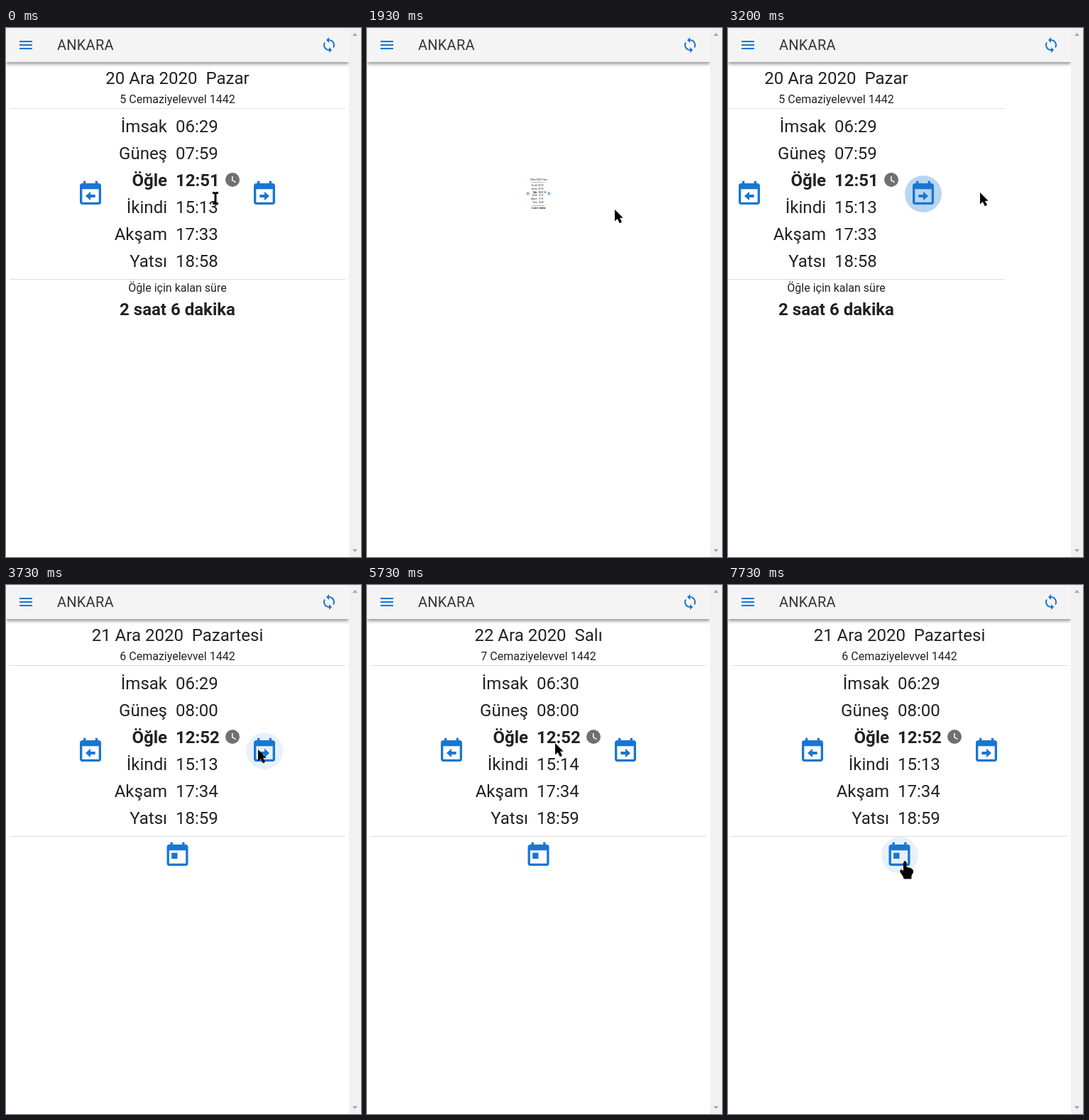
Write an HTML page that moves like this. It is 500x746 px and loops after 8000 ms.

```html
<!DOCTYPE html>
<html lang="tr">
<head>
<meta charset="utf-8">
<style>
  html, body { margin: 0; width: 100%; height: 100%; overflow: hidden; background: #fff; }
  svg { display: block; }
  text { font: 24px Roboto, sans-serif; fill: #212121; white-space: pre; }
  .mid { text-anchor: middle; }
  .end { text-anchor: end; }
  .small { font-size: 16px; }
  .bold { font-weight: 700; }
  .title { font-size: 20px; letter-spacing: .0125em; fill: #333; }
  .blue { fill: #1976d2; }
</style>
</head>
<body>
<svg width="500" height="746" viewBox="0 0 500 746">
  <defs>
    <clipPath id="view"><path d="M0 0H483V746H0z"/></clipPath>
    <filter id="shadow" x="-5%" y="-20%" width="110%" height="160%">
      <feDropShadow dx="0" dy="2.5" stdDeviation="2.8" flood-color="#000" flood-opacity=".45"/>
    </filter>
    <path id="calendar" d="M19 3h-1V1h-2v2H8V1H6v2H5c-1.1 0-2 .9-2 2v14c0 1.1.9 2 2 2h14c1.1 0 2-.9 2-2V5c0-1.1-.9-2-2-2zm0 16H5V8h14z"/>
    <path id="point" d="M8 12.6h4V10l4.2 3.8-4.2 3.7V15H8z"/>
  </defs>
  <g clip-path="url(#view)">
    <g id="page">
      <path d="M5 113.5H478M5 354.5H478" stroke="#ddd"/>
      <text id="date" class="mid" x="241.5" y="79"></text>
      <text id="hijri" class="mid small" x="241.5" y="106"></text>
      <g id="rows"></g>
      <path transform="translate(307 202)" fill="#707070" d="M12 2a10 10 0 1 0 0 20a10 10 0 1 0 0-20zm4.2 14.2L11 13V7h1.5v5.2l4.5 2.7z"/>
      <circle id="prevGlow" class="blue" cx="119" cy="234" r="26"/>
      <circle id="nextGlow" class="blue" cx="364" cy="234" r="26"/>
      <g class="blue" transform="translate(99 214) scale(1.6667)">
        <use href="#calendar"/><use href="#point" transform="matrix(-1 0 0 1 24 0)"/>
      </g>
      <g class="blue" transform="translate(344 214) scale(1.6667)">
        <use href="#calendar"/><use href="#point"/>
      </g>
      <g id="left">
        <text class="mid small" x="241.5" y="372">Öğle için kalan süre</text>
        <text class="mid bold" x="241.5" y="405">2 saat 6 dakika</text>
      </g>
      <g id="today">
        <circle id="todayGlow" class="blue" cx="242" cy="381" r="26"/>
        <g class="blue" transform="translate(221.5 361) scale(1.6667)">
          <use href="#calendar"/><path d="M7 10h5v5H7z"/>
        </g>
      </g>
    </g>
    <circle id="spinner" r="150" fill="none" stroke="#1976d2" stroke-width="20" stroke-linecap="round"/>
    <path d="M0 0H483V48H0z" fill="#f4f4f4" filter="url(#shadow)"/>
    <circle id="syncGlow" class="blue" cx="454.5" cy="24" r="22.5"/>
    <path class="blue" transform="translate(16 12)" d="M3 18h18v-2H3zm0-5h18v-2H3zm0-7v2h18V6z"/>
    <text class="title" x="72" y="31">ANKARA</text>
    <path class="blue" transform="translate(443 12)" d="M12 4V1L8 5l4 4V6c3.3 0 6 2.7 6 6 0 1-.25 2-.7 2.8l1.46 1.46C19.5 15 20 13.6 20 12c0-4.4-3.6-8-8-8zm0 14c-3.3 0-6-2.7-6-6 0-1 .25-2 .7-2.8L5.24 7.74C4.5 9 4 10.4 4 12c0 4.4 3.6 8 8 8v3l4-4-4-4z"/>
  </g>
  <path d="M483 0H500V746H483z" fill="#f1f1f1"/>
  <path id="thumb" d="M485 17H498V690H485z" fill="#c1c1c1"/>
  <path d="M488 11h7l-3.5-4z" fill="#a3a3a3"/>
  <path id="down" d="M488 735h7l-3.5 4z"/>
  <path id="cursor"/>
</svg>
<script>
const LOOP = 8000, STEP = 1000 / 15, WIDTH = 483, OUT = 200, IN = 430;
const $ = id => document.getElementById(id);
const set = (id, attrs) => { for (const k in attrs) $(id).setAttribute(k, attrs[k]); };
const show = (id, on) => { $(id).style.display = on ? '' : 'none'; };
const clamp = v => Math.max(0, Math.min(1, v));
const within = (t, a, b) => t >= a && t < b;
const smooth = p => p * p * (3 - 2 * p);

const names = ['İmsak', 'Güneş', 'Öğle', 'İkindi', 'Akşam', 'Yatsı'];
const days = [
  ['20 Ara 2020\u00a0 Pazar', 5, '06:29 07:59 12:51 15:13 17:33 18:58'],
  ['21 Ara 2020\u00a0 Pazartesi', 6, '06:29 08:00 12:52 15:13 17:34 18:59'],
  ['22 Ara 2020\u00a0 Salı', 7, '06:30 08:00 12:52 15:14 17:34 18:59']
];
// start, direction, day shown afterwards
const slides = [[3086, -1, 1], [4263, -1, 2], [6548, 1, 1]];
// time, x, y
const track = [
  [0, 295, 240], [40, 295, 240], [330, 385, 130], [600, 452, 16], [800, 452, 28],
  [1690, 452, 28], [1930, 349, 256], [2250, 353, 240], [2600, 355, 232],
  [5550, 355, 232], [5800, 230, 219], [6070, 105, 246],
  [7280, 105, 246], [7430, 125, 220], [7730, 249, 390], [LOOP, 249, 390]
];
const hands = [[560, 1720], [2480, 3120], [6010, 6580], [7660, LOOP]];
const shapes = {
  beam: 'M-4-9h3l1 1 1-1h3v3h-2.5V6H4v3H1L0 8l-1 1h-3V6h2.5V-6H-4z',
  arrow: 'M0 0V16.5l3.7-3.6 3.1 6.3 3.2-1.5-3-6h4.7z',
  hand: 'M-1.5 1Q0-2 2 1V8l7 2q3 1 2.5 5L9 20v4H-1l-1-3-4-6q-1-4 2-3l2.5 2z'
};

let shown = -1;
function setDay(n) {
  if (n === shown) return;
  shown = n;
  const [date, hijri, times] = days[n];
  $('date').textContent = date;
  $('hijri').textContent = hijri + ' Cemaziyelevvel 1442';
  $('rows').innerHTML = times.split(' ').map((time, i) => {
    const y = 147 + 38 * i, bold = i === 2 ? 'bold' : '';
    return `<text class="end ${bold}" x="227" y="${y}">${names[i]}</text>
      <text class="${bold}" x="239" y="${y}">${time}</text>`;
  }).join('');
  show('left', n === 0);
  show('today', n > 0);
}

// The page flies out to one side, swaps its day and returns from there
function slideState(t) {
  let x = 0, day = 0;
  for (const [start, dir, next] of slides) {
    const a = t - start;
    if (a < 0) break;
    if (a < OUT) x = dir * WIDTH * (a / OUT) ** 3;
    else {
      day = next;
      x = dir * WIDTH * (1 - clamp((a - OUT) / IN)) ** 3;
    }
  }
  return { x: Math.round(x), day };
}

function pageScale(t) {
  if (t < 1030) return 1 - clamp((t - 880) / 150) ** 3;
  return 1 - (1 - clamp((t - 1911) / 450)) ** 3;
}

// Hover tint plus a press ripple that fades
function glow(id, t, from, to, presses, strength = .2) {
  let alpha = .1 * clamp((t - from) / 100) * clamp((to - t) / 100);
  for (const press of presses) {
    const a = t - press;
    alpha += strength * clamp(a / 100) * clamp((360 - a) / 150);
  }
  set(id, { opacity: alpha });
}

function drawSpinner(t) {
  const on = within(t, 1035, 1905);
  show('spinner', on);
  if (!on) return;
  const p = (t - 1035) / 1400, unit = 150 / 20.2;
  const e = smooth(p < .5 ? p * 2 : p * 2 - 1);
  const dash = p < .5 ? 1 + 99 * e : 100;
  const shift = p < .5 ? 15 * e : 15 + 110 * e;
  const scale = 1 - clamp((t - 1735) / 170) ** 3;
  set('spinner', {
    transform: `translate(241.5 373) scale(${scale}) rotate(${360 * p})`,
    'stroke-dasharray': `${dash * unit} ${200 * unit}`,
    'stroke-dashoffset': -shift * unit
  });
}

function drawCursor(t) {
  const i = track.findIndex(k => k[0] > t);
  const [t0, x0, y0] = track[i - 1], [t1, x1, y1] = track[i];
  const p = (t - t0) / (t1 - t0);
  const hand = hands.some(([a, b]) => within(t, a, b));
  set('cursor', {
    d: shapes[hand ? 'hand' : t < 100 ? 'beam' : 'arrow'],
    transform: `translate(${Math.round(x0 + (x1 - x0) * p)} ${Math.round(y0 + (y1 - y0) * p)})`,
    fill: hand && within(t, 960, 1250) ? '#4a2c12' : '#000',
    stroke: hand ? '#000' : 'none'
  });
}

function render(t) {
  const { x, day } = slideState(t), scale = pageScale(t);
  setDay(day);
  show('page', scale > .001);
  set('page', {
    transform: scale === 1 ? `translate(${x} 0)`
      : `translate(241.5 234) scale(${scale}) translate(-241.5 -234)`
  });
  glow('syncGlow', t, 560, 1800, [920], .26);
  glow('nextGlow', t, 2480, 5650, [3016, 4193]);
  glow('prevGlow', t, 6010, 7400, [6470]);
  glow('todayGlow', t, 7620, LOOP + 200, []);
  drawSpinner(t);
  const overflow = within(t, 1780, 1910);
  show('thumb', overflow);
  set('down', { fill: overflow ? '#505050' : '#a3a3a3' });
  drawCursor(t);
}

function tick(now) {
  const n = Math.floor((now % LOOP + 4) / STEP);
  render(Math.round(n * STEP / 10) * 10 % LOOP);
  requestAnimationFrame(tick);
}
render(0);
requestAnimationFrame(tick);
</script>
</body>
</html>
```
